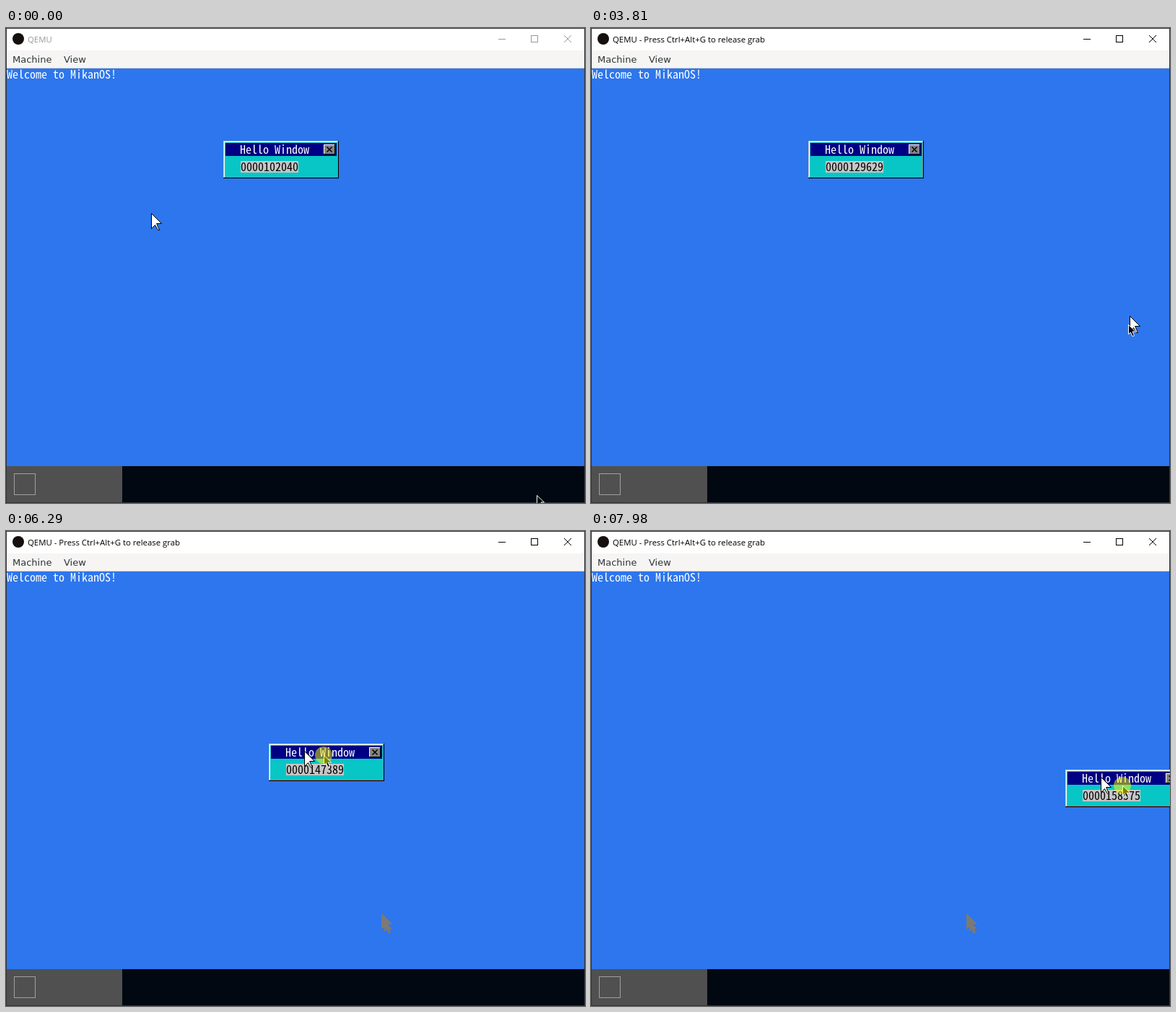
An HTML page with a canvas for the animation above (8 s loop, 802 by 657 pixels).

```html
<!DOCTYPE html>
<html lang="en">
<head>
<meta charset="utf-8">
<title>Window dragging</title>
<style>
  html, body { margin: 0; width: 100%; height: 100%; overflow: hidden; }
  canvas { display: block; width: 802px; height: 657px; }
</style>
</head>
<body>
<canvas id="stage" width="802" height="657"></canvas>
<script>
const ctx = document.getElementById('stage').getContext('2d');
const LOOP = 8000, STEP = 77.6, LAST = 103;
const FOCUS = 14, PRESS = 76, DRAG = 78;   // in steps
const GREY = '#c6c6c6', SHADE = '#848484';

// Key points: [step, value...]
const hostPath = [
  [0, 735, 646], [8, 377, 322], [11, 226, 248], [14, 226, 248], [18, 336, 184], [19, 335, 198],
  [24, 372, 168], [33, 160, 82], [36, 90, 65], [38, 150, 47], [44, 744, 110], [48, 771, 390],
  [49, 744, 410], [55, 217, 575], [59, 104, 614], [63, 218, 612], [66, 345, 500],
  [72, 375, 158], [78, 375, 158], [80, 438, 296], [81, 440, 310], [87, 264, 494],
  [88, 238, 484], [91, 188, 340], [93, 235, 233], [98, 641, 162], [LAST, 736, 352]
];
const counter = [
  [0, 102040], [19, 112983], [49, 129629], [63, 137523], [81, 147389], [88, 150779], [LAST, 158575]
];

// Smooth curve through the key points that never overshoots them.
function sample(keys, step) {
  const i = Math.max(1, keys.findIndex(key => key[0] >= step));
  const slope = (j, n) => keys[j - 1] && keys[j]
    ? (keys[j][n] - keys[j - 1][n]) / (keys[j][0] - keys[j - 1][0]) : 0;
  const tangent = (j, n) => {
    const a = slope(j, n), b = slope(j + 1, n);
    return a * b > 0 ? 2 * a * b / (a + b) : 0;
  };
  const from = keys[i - 1], to = keys[i], span = to[0] - from[0];
  const u = (step - from[0]) / span, v = 1 - u;
  return from.slice(1).map((value, k) => {
    const n = k + 1;
    return Math.round(value * v * v * (1 + 2 * u) + to[n] * u * u * (3 - 2 * u)
      + span * u * v * (tangent(i - 1, n) * v - tangent(i, n) * u));
  });
}

function rect(x, y, w, h, color) {
  ctx.fillStyle = color;
  ctx.fillRect(x, y, w, h);
}

function frame(x, y, w, h, color) {
  ctx.strokeStyle = color;
  ctx.lineWidth = 1;
  ctx.strokeRect(x + .5, y + .5, w - 1, h - 1);
}

function cross(x, y, size, color, width) {
  ctx.strokeStyle = color;
  ctx.lineWidth = width;
  ctx.beginPath();
  ctx.moveTo(x, y); ctx.lineTo(x + size, y + size);
  ctx.moveTo(x + size, y); ctx.lineTo(x, y + size);
  ctx.stroke();
}

function disc(x, y, r, color) {
  ctx.fillStyle = color;
  ctx.beginPath();
  ctx.arc(x, y, r, 0, 7);
  ctx.fill();
}

function label(text, x, y, font, color) {
  ctx.font = font;
  ctx.fillStyle = color;
  ctx.fillText(text, x, y);
}

// Console glyphs sit in cells of 8 by 16 pixels.
const CELL_FAMILY = '"Noto Sans Mono CJK JP", "Noto Sans Mono", monospace';
ctx.font = `16px ${CELL_FAMILY}`;
const cellFont = `${16 * 8 / ctx.measureText('0').width}px ${CELL_FAMILY}`;
function cells(text, x, y, color) {
  [...text].forEach((char, i) => label(char, x + i * 8, y + 14, cellFont, color));
}

const guestArrow = new Path2D('M0 0V21L5 16 9 23H11L7.5 15 7 14H14Z');
const hostArrow = new Path2D('M0 0V13L3 10.5 5.5 16 8 15 5.5 9.5H10Z');
function pointer(arrow, x, y, fill, outline) {
  ctx.save();
  ctx.translate(x + .5, y + .5);
  ctx.fillStyle = fill;
  ctx.fill(arrow);
  ctx.strokeStyle = outline;
  ctx.lineWidth = 1;
  ctx.stroke(arrow);
  ctx.restore();
}

function drawChrome(focused) {
  const ink = focused ? '#000' : '#999';
  const menuFont = '13px "DejaVu Sans", sans-serif';
  rect(0, 0, 802, 657, '#303338');
  rect(1, 1, 800, 30, '#fff');
  rect(1, 31, 800, 24, '#f6f5f4');
  rect(1, 55, 800, 1, '#d5d0cc');
  disc(17, 15, 8, '#15100e');
  label(focused ? 'QEMU - Press Ctrl+Alt+G to release grab' : 'QEMU',
    30, 20, '11.4px "Open Sans", sans-serif', ink);
  rect(682, 15, 10, 1, ink);
  frame(727, 10, 10, 10, ink);
  cross(773, 10, 10, ink, 1);
  label('Machine', 9, 48, menuFont, '#2e3436');
  label('View', 80, 48, menuFont, '#2e3436');
}

function drawDesktop(step) {
  rect(1, 56, 800, 550, '#2d76ed');
  cells('Welcome to MikanOS!', 1, 56, '#fff');
  rect(1, 606, 800, 50, '#010811');
  rect(1, 606, 160, 50, '#505050');
  frame(11, 616, 30, 30, '#a0a0a0');
  // Stain left behind by the two pointers
  if (step >= 54) {
    pointer(guestArrow, 520, 529, '#7d7975', '#7d7975');
    pointer(hostArrow, 524, 540, '#7d7975', '#7d7975');
  }
}

function drawWindow(x, y, count) {
  rect(x, y, 160, 52, '#000');
  rect(x, y, 159, 51, GREY);
  rect(x + 1, y + 1, 158, 50, SHADE);
  rect(x + 1, y + 1, 157, 49, '#fff');
  rect(x + 2, y + 2, 156, 48, '#08c6c6');
  rect(x + 3, y + 3, 154, 18, '#000084');
  cells('Hello Window', x + 23, y + 4, '#fff');

  rect(x + 139, y + 5, 16, 14, '#000');
  rect(x + 139, y + 5, 15, 13, '#fff');
  rect(x + 140, y + 6, 14, 12, SHADE);
  cross(x + 143.5, y + 8.5, 7, '#000', 1.5);

  rect(x + 24, y + 28, 80, 16, GREY);
  cells(String(count).padStart(10, '0'), x + 24, y + 28, '#000');
}

function draw(now) {
  const step = Math.min(LAST, Math.floor((now % LOOP + 14) / STEP));
  const [hostX, hostY] = sample(hostPath, step);
  // The guest pointer and the dragged window trail the host pointer by one step.
  const [guestX, guestY] = sample(hostPath, Math.max(step - 1, FOCUS));
  const [gripX, gripY] = sample(hostPath, Math.max(step - 1, DRAG));
  const pressed = step >= PRESS || step === FOCUS - 1 || step === FOCUS;

  drawChrome(step >= FOCUS);
  drawDesktop(step);
  drawWindow(gripX - 74, gripY - 2, sample(counter, step)[0]);

  ctx.save();
  ctx.beginPath();
  ctx.rect(1, 56, 800, 600);
  ctx.clip();
  pointer(guestArrow, guestX - 25, guestY + 8, '#fff', '#000');
  ctx.restore();

  pointer(hostArrow, hostX, hostY, '#000', '#fff');
  if (pressed) disc(hostX, hostY, 12, 'rgba(255, 255, 0, .5)');
}

const start = performance.now();
function tick() {
  draw(performance.now() - start);
  requestAnimationFrame(tick);
}
tick();
</script>
</body>
</html>
```
